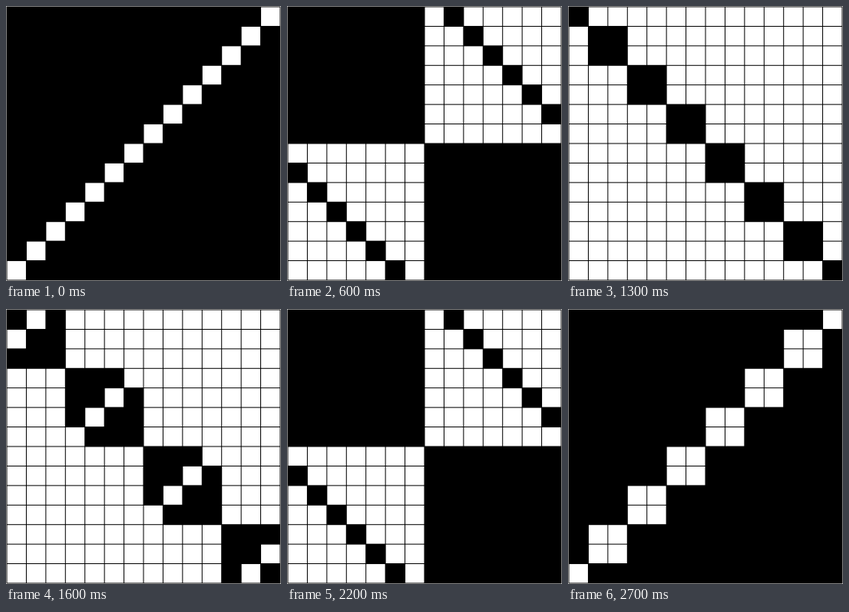
Recreate the animation shown at these times as an HTML page with a canvas. Size 344x344 px, loop 2800 ms.

```html
<!DOCTYPE html>
<html lang="en">
<head>
<meta charset="utf-8">
<title>XOR threshold</title>
<style>
html, body { margin: 0; width: 100%; height: 100%; overflow: hidden; background: #fff; }
canvas { display: block; }
</style>
</head>
<body>
<canvas id="stage" width="344" height="344"></canvas>
<script>
const SIZE = 344, N = 14, STEP_MS = 100;
const MARGIN = 1, LINE = 1;
const CELL = (SIZE - 2 * MARGIN) / N;
const ctx = document.getElementById('stage').getContext('2d');

// Fills a square given by its top left corner, grown by `grow` on every side.
function square(x, y, side, grow, color) {
  ctx.fillStyle = color;
  ctx.fillRect(x - grow, y - grow, side + 2 * grow, side + 2 * grow);
}

// A cell is black while row XOR column (numbered from 1) stays within the limit.
// White cells are inset by half a line, so the black behind them forms the mesh.
function draw(limit) {
  ctx.clearRect(0, 0, SIZE, SIZE);
  square(MARGIN, MARGIN, N * CELL, LINE / 2, '#000');
  for (let row = 0; row < N; row++) {
    for (let col = 0; col < N; col++) {
      if (((row + 1) ^ (col + 1)) > limit) {
        square(MARGIN + col * CELL, MARGIN + row * CELL, CELL, -LINE / 2, '#fff');
      }
    }
  }
}

// The limit falls from 14 to 0 and climbs back.
function tick() {
  const step = Math.floor(performance.now() / STEP_MS) % (2 * N);
  draw(Math.abs(N - step));
  requestAnimationFrame(tick);
}
tick();
</script>
</body>
</html>
```
